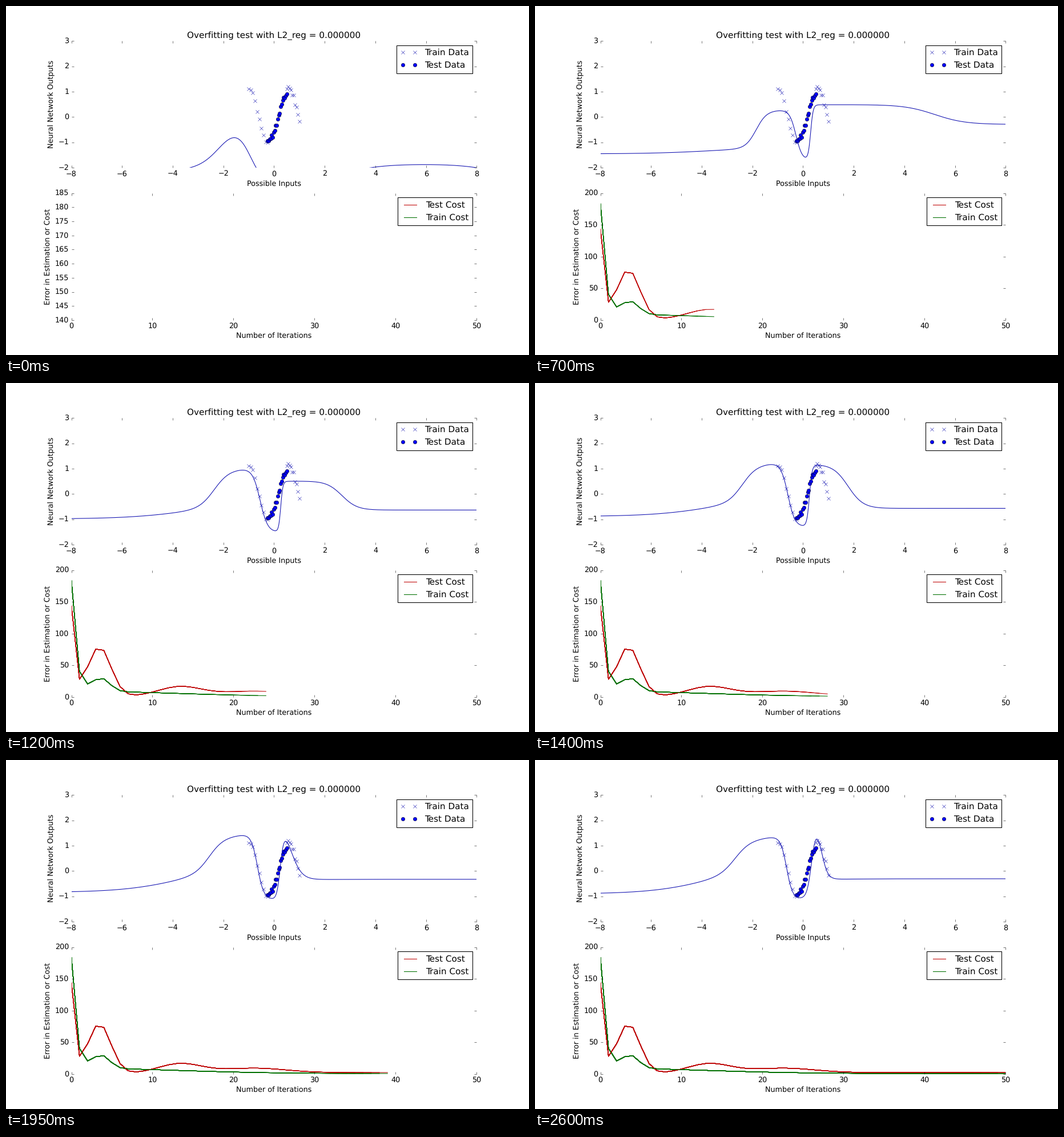
These frames come from a looping animation (916x611 px, 2.65 s). A matplotlib script:

```python
import numpy as np
import matplotlib.pyplot as plt
from matplotlib.animation import FuncAnimation

W, H, DPI = 916, 611, 76.375
FRAMES, STEP_MS = 53, 50
BLUE, RED, GREEN = "#1010b0", "#c00808", "#007000"

plt.style.use("classic")
plt.rcParams.update({
    "font.family": "DejaVu Sans",
    "text.hinting": "none",
    "figure.facecolor": "white",
    "savefig.dpi": "figure",
})


# The fitted curve is a small tanh network: a start level plus five soft steps
# (creep, hump rise, drop, climb, fall), each a (centre, width, height).
def network(level, *steps):
    return level, np.array(steps)


CHECKPOINTS = {
    0: network(-2.3, (-3.6, 2.4, .4), (-2.1, .8, 1.75), (-.95, .55, -2.5),
               (2.6, 1.6, .8), (9, 1.5, -.7)),
    6: network(-2.63, (-8, 2.4, 1.1), (-1.45, .37, 1.95), (-.45, .3, -.27),
               (.05, .085, 1.25), (.75, .3, -.42)),
    14: network(-1.45, (-3.6, 2.4, .25), (-1.85, .42, 1.5), (-.28, .25, -2),
                (.3, .1, 2.19), (5.2, 1.2, -.78)),
    24: network(-.98, (-3.6, 2.4, .55), (-2.36, .6, 1.5), (-.55, .3, -2.55),
                (.265, .085, 2), (2.68, .6, -1.15)),
    33: network(-.76, (-3.6, 2.4, .95), (-2.43, .55, 1.4), (-.655, .25, -2.55),
                (.24, .13, 3), (.65, .6, -2.52)),
    45: network(-.92, (-3.6, 2.4, 1.15), (-2.68, .6, 1.3), (-.655, .24, -2.6),
                (.255, .16, 3), (.69, .25, -2.1)),
    52: network(-.9, (-3.6, 2.4, 1.15), (-2.68, .6, 1.23), (-.65, .24, -2.52),
                (.335, .18, 3), (.73, .24, -2.265)),
}
TIMES = list(CHECKPOINTS)
grid = np.linspace(-8, 8, 1000)


def progress(seg, t):
    """Early training overshoots, then brakes; later it moves evenly."""
    if seg == 0:
        return t + .75 * np.sin(np.pi * t) * (1 - .1 * t)
    if seg == 1:
        return 1 - (1 - t) ** 2.6
    return t


def fit(n):
    seg = max(i for i, t in enumerate(TIMES[:-1]) if t <= n)
    start, end = TIMES[seg:seg + 2]
    p = progress(seg, (n - start) / (end - start))
    (level0, steps0), (level1, steps1) = CHECKPOINTS[start], CHECKPOINTS[end]
    centre, width, _ = (steps0 + (steps1 - steps0) * min(p, 1)).T
    height = (steps0 + (steps1 - steps0) * p)[:, 2]
    rise = (1 + np.tanh((grid[:, None] - centre) / width)) / 2
    return level0 + (level1 - level0) * p + rise @ height


def bump(n, centre, width):
    return np.exp(-((n - centre) / width) ** 2)


rng = np.random.default_rng(4)


def samples(x, gain, lift, noise):
    return gain * np.sin(4 * x - .68) + lift + rng.normal(0, noise, len(x))


train_x = np.concatenate([np.linspace(-1, -.25, 10), np.linspace(.5, 1, 10)])
test_x = np.linspace(-.25, .5, 20)
train_y = samples(train_x, 1.08, .06, .04)
test_y = samples(test_x, .93, .02, .05)

n = np.arange(FRAMES)
test_cost = (140 * np.exp(-2.6 * n) + 79 * bump(n, 3.45, 2) + 15 * bump(n, 13.4, 3.8)
             + 7.3 * bump(n, 22.5, 5.5) + 2.6 * np.tanh(n / 20))
train_cost = (174.6 * np.exp(-1.75 * n) + 21 * bump(n, 3.65, 1.5)
              + 8.5 * bump(n, 0, 18) + .8)

fig = plt.figure(figsize=((W + .01) / DPI, (H + .01) / DPI), dpi=DPI)
top = fig.add_subplot(211, frameon=False)
low = fig.add_subplot(212, frameon=False)

top.plot(train_x, train_y, "x", color=BLUE, label="Train Data")
top.plot(test_x, test_y, "bo", label="Test Data")
curve, = top.plot([], [], color=BLUE)
top.set(xlim=(-8, 8), ylim=(-2, 3), xticks=range(-8, 9, 2), yticks=range(-2, 4),
        xlabel="Possible Inputs", ylabel="Neural Network Outputs",
        title="Overfitting test with L2_reg = 0.000000")
top.legend(loc="upper right")

# Every iteration draws both histories again on top of the older ones.
history = []
for k in range(FRAMES):
    red, = low.plot(n[:k + 1], test_cost[:k + 1], color=RED)
    green, = low.plot(n[:k + 1], train_cost[:k + 1], color=GREEN)
    history.append((red, green))
low.set(xlim=(0, 50), xticks=range(0, 51, 10),
        xlabel="Number of Iterations", ylabel="Error in Estimation or Cost")
low.legend(history[0], ["Test Cost", "Train Cost"], loc="upper right")


def cost_scale(frame):
    if frame == 0:
        return 140, 185, 5
    if frame == 1:
        return 20, 200, 20
    return 0, 200, 50


def draw(frame):
    curve.set_data(grid, fit(frame))
    for k, pair in enumerate(history):
        for line in pair:
            line.set_visible(k <= frame)
    lo, hi, gap = cost_scale(frame)
    low.set_yticks(np.arange(lo, hi + 1, gap))
    low.set_ylim(lo, hi)
    return []


anim = FuncAnimation(fig, draw, frames=FRAMES, interval=STEP_MS,
                     init_func=lambda: draw(0), repeat=True, repeat_delay=0)
plt.show()
```
